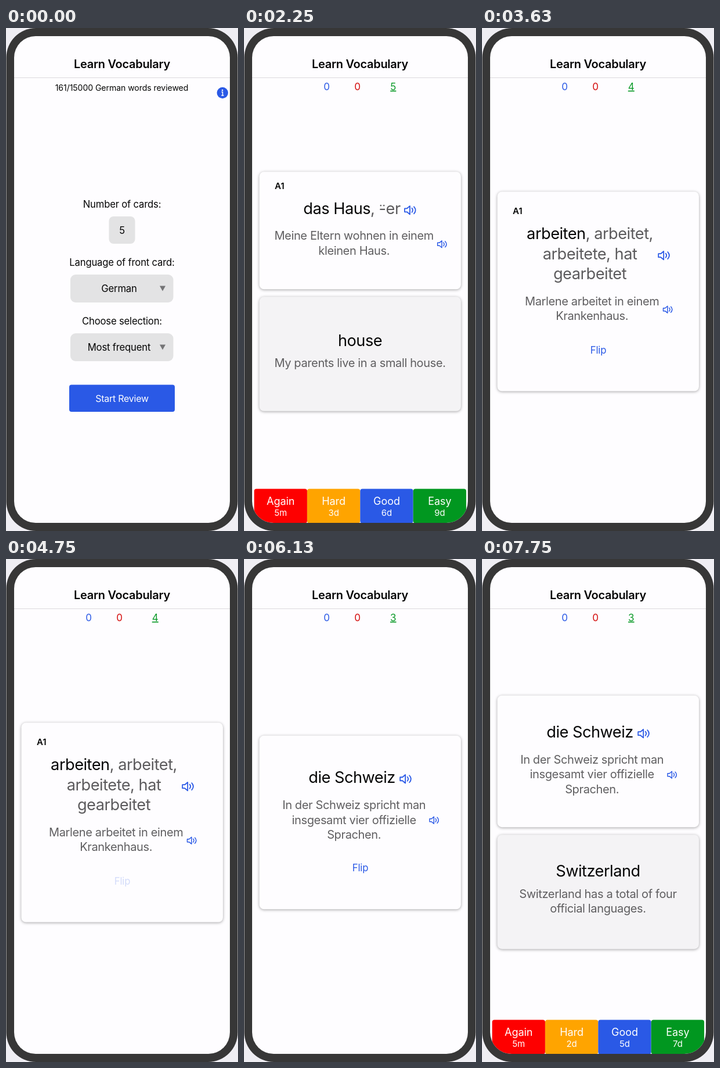
Write an HTML page that moves like this. It is 400 by 865 pixels and loops after 8 s.

```html
<!DOCTYPE html>
<html lang="en">
<head>
<meta charset="utf-8">
<title>Vocabulary review</title>
<style>
  html, body { margin: 0; width: 100%; height: 100%; overflow: hidden; background: #efeef3; }
  svg { display: block; width: 100vw; height: 100vh; }
  text {
    font-family: Inter, Roboto, sans-serif;
    font-optical-sizing: none;
    text-anchor: middle;
    fill: #050505;
  }
  .head { font-size: 20px; font-weight: 600; letter-spacing: -.3px; }
  .status { font-size: 14.1px; letter-spacing: -.08px; }
  .label { font-size: 16.7px; letter-spacing: -.2px; }
  .button { font-size: 16px; letter-spacing: -.25px; fill: #fff; }
  .flip { font-size: 16.7px; letter-spacing: -.2px; fill: #2a59e6; }
  .count { font-size: 17px; }
  .level { font-size: 15px; font-weight: 600; text-anchor: start; }
  .word { font-size: 27.2px; letter-spacing: -.5px; }
  .word .forms { fill: #5c5b5d; }
  .sentence { font-size: 20px; letter-spacing: -.36px; fill: #5f5e60; }
  .grade { font-size: 18px; letter-spacing: -.05px; fill: #fff; }
  .delay { font-size: 15px; letter-spacing: -.1px; fill: #fff; }
  .field { fill: #e3e3e4; }
  .card { fill: #fefdff; filter: drop-shadow(0 1px 2.5px rgba(0, 0, 0, .36)); }
  .card.answer { fill: #f4f3f5; }
  .speaker { fill: none; stroke: #2a59e6; stroke-width: 1.8; stroke-linejoin: round; stroke-linecap: round; }
</style>
</head>
<body>
<svg viewBox="0 0 400 865" preserveAspectRatio="none">
  <defs>
    <clipPath id="screen"><rect x="14" y="14" width="372" height="837" rx="37"/></clipPath>
    <path id="speaker" class="speaker" d="M-9.5-3h4l5-4.2v14.4l-5-4.2h-4zM3-3.5q3 3.5 0 7M6.5-6q5.5 6 0 12"/>
  </defs>
  <rect x=".5" width="399" height="865" rx="51" fill="#373737"/>
  <rect x="14" y="14" width="372" height="837" rx="37" fill="#fefdff"/>
  <path d="M14 85.5H386" stroke="#dcd9dd"/>
  <text class="head" x="200" y="62" dy=".36em">Learn Vocabulary</text>
  <g id="scenes" clip-path="url(#screen)"></g>
</svg>
<script>
const LOOP = 8000;
const BLUE = '#2a59e6';
const percent = ms => ms / LOOP * 100 + '%';

const text = (cls, x, y, content) =>
  `<text class="${cls}" x="${x}" y="${y}" dy=".36em">${content}</text>`;
const lines = (cls, x, y, step, list) =>
  list.map((line, i) => text(cls, x, y + i * step, line)).join('');
const box = (cls, x, y, w, h, r, fill = '') =>
  `<rect class="${cls}" x="${x}" y="${y}" width="${w}" height="${h}" rx="${r}" ${fill && `fill="${fill}"`}/>`;
const speaker = ([x, y], scale) =>
  `<use href="#speaker" transform="translate(${x} ${y}) scale(${scale})"/>`;
const pressable = content => `<g class="press">${content}</g>`;
const forms = content => `<tspan class="forms">${content}</tspan>`;

function home() {
  const select = (y, value) => box('field', 111, y, 177.5, 48, 9) +
    text('label', 195, y + 24, value) +
    `<path d="M265 ${y + 19.5}h10l-5 9z" fill="#747476"/>`;
  return text('status', 199.5, 102.5, '161/15000 German words reviewed') +
    `<circle cx="373.3" cy="111.5" r="9.7" fill="${BLUE}"/>
     <path d="M371.5 110h2v6m-2.2 0h4.2" fill="none" stroke="#fff" stroke-width="1.5"/>
     <circle cx="373.1" cy="107" r="1.3" fill="#fff"/>` +
    text('label', 200, 303, 'Number of cards:') +
    box('field', 177.5, 324, 45, 47, 8) + text('label', 200, 347.5, '5') +
    text('label', 200, 402.5, 'Language of front card:') + select(424, 'German') +
    text('label', 200, 504, 'Choose selection:') + select(525, 'Most frequent') +
    pressable(box('', 109, 613.5, 182, 46.5, 4, BLUE) + text('button', 200, 637, 'Start Review'));
}

function counters(left) {
  return [[142.5, 0, BLUE], [195.5, 0, '#d40b0b'], [257.3, left, '#0a9a28']].map(([x, n, color], i) =>
    text('count', x, 100.5, `<tspan style="fill:${color}" ${i === 2 ? 'text-decoration="underline"' : ''}>${n}</tspan>`)).join('');
}

// Contents of the question card, relative to its top edge
function question(card) {
  const sentenceY = 110 + (card.word.length - 1) * 34.5;
  return (card.level ? text('level', 53, 24, card.level) : '') +
    lines('word', 186, 62.8, 34.5, card.word) + (card.extra || '') +
    lines('sentence', 189.7, sentenceY, 25.6, card.sentence) +
    speaker(card.wordIcon, 1) + speaker(card.sentenceIcon, .82);
}

function front(card) {
  const height = card.height + 72;
  const top = 453 - height / 2;
  return counters(card.left) + box('card', 26.5, top, 347.5, height, 8) +
    `<g transform="translate(0 ${top + 9})">${question(card)}</g>` +
    pressable(text('flip', 200.5, top + height - 71, 'Flip'));
}

function back(card) {
  const answerTop = card.top + card.height + 13;
  const wordY = answerTop + (card.meaning.length > 1 ? 62.5 : 75);
  const grades = [['Again', '5m', '#fe0000'], ['Hard', card.delays[0], '#ffa400'],
    ['Good', card.delays[1], BLUE], ['Easy', card.delays[2], '#019720']];
  const bar = grades.map(([name, delay, color], i) => {
    const x = 17.5 + i * 91.4;
    const cell = box('', x, 792.5, 91.4, 59, 4, color) +
      text('grade', x + 45.7, 813.5, name) + text('delay', x + 45.7, 833.5, delay);
    return name === 'Easy' ? pressable(cell) : cell;
  }).join('');
  return counters(card.left) + box('card', 26.5, card.top, 347.5, card.height, 8) +
    `<g transform="translate(0 ${card.top})">${question(card)}</g>` +
    box('card answer', 26.5, answerTop, 347.5, 196.5, 8) +
    text('word', 200, wordY, card.answer) +
    lines('sentence', 200, wordY + 38.7, 25.6, card.meaning) + bar;
}

const house = {
  left: 5, level: 'A1', top: 247.3, height: 202, delays: ['3d', '6d', '9d'],
  word: ['das Haus' + forms(', -er')],
  extra: '<path d="M235.8 58h.01m5.4 0h.01" stroke="#5c5b5d" stroke-width="2.6" stroke-linecap="round"/>',
  sentence: ['Meine Eltern wohnen in einem', 'kleinen Haus.'],
  wordIcon: [286.5, 66], sentenceIcon: [341.5, 124.5],
  answer: 'house', meaning: ['My parents live in a small house.']
};
const work = {
  left: 4, level: 'A1', top: 212.8, height: 271, delays: ['2d', '5d', '7d'],
  word: ['arbeiten' + forms(', arbeitet,'), forms('arbeitete, hat'), forms('gearbeitet')],
  sentence: ['Marlene arbeitet in einem', 'Krankenhaus.'],
  wordIcon: [313.7, 100.7], sentenceIcon: [320.3, 193.7],
  answer: 'to work', meaning: ['Marlene works in a hospital.']
};
const country = {
  left: 3, top: 234.7, height: 226.5, delays: ['2d', '5d', '7d'],
  word: ['die Schweiz'],
  sentence: ['In der Schweiz spricht man', 'insgesamt vier offizielle', 'Sprachen.'],
  wordIcon: [278.7, 65.5], sentenceIcon: [327.8, 136.5],
  answer: 'Switzerland', meaning: ['Switzerland has a total of four', 'official languages.']
};

// [content, start, press] in ms; each scene lasts until the next one starts
const scenes = [
  [home(), 0, 1000],
  [front(house), 1380, 1880],
  [back(house), 2250, 3130],
  [front(work), 3380, 4750],
  [back(work), 5000, 5750],
  [front(country), 6000, 7000],
  [back(country), 7380, LOOP]
];

let css = '';
document.getElementById('scenes').innerHTML = scenes.map(([content, start, press], i) => {
  const end = i + 1 < scenes.length ? scenes[i + 1][1] : LOOP;
  const hiddenFirst = start ? '0% { visibility: hidden }' : '';
  css += `@keyframes show${i} { ${hiddenFirst} ${percent(start)} { visibility: visible }
      ${percent(end)}, 100% { visibility: hidden } }
    #scene${i} { animation: show${i} ${LOOP}ms step-end infinite }`;
  if (press < LOOP) {
    css += `@keyframes press${i} { 0% { opacity: 1 } ${percent(press)}, 100% { opacity: .2 } }
      #scene${i} .press { animation: press${i} ${LOOP}ms step-end infinite }`;
  }
  return `<g id="scene${i}">${content}</g>`;
}).join('');
document.head.appendChild(document.createElement('style')).textContent = css;
</script>
</body>
</html>
```
